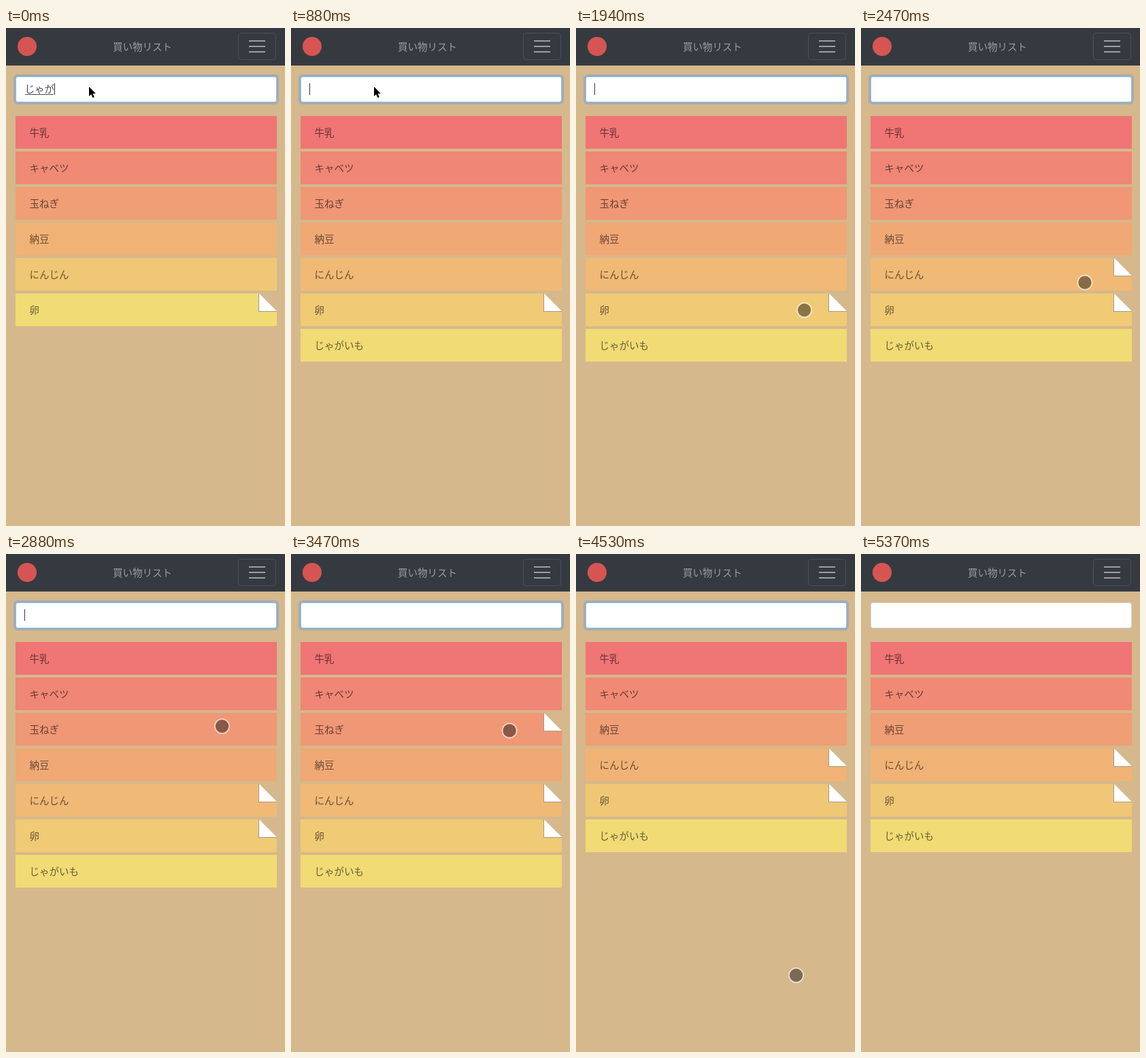
An HTML page with a canvas for the animation above (5470 ms loop, 410x730 px).

```html
<!DOCTYPE html>
<html lang="ja">
<head>
<meta charset="utf-8">
<title>買い物リスト</title>
<style>
  html, body { margin: 0; width: 100%; height: 100%; overflow: hidden; background: #d5b88c; }
  canvas { display: block; }
</style>
</head>
<body>
<canvas id="stage" width="410" height="730"></canvas>
<script>
const ctx = document.getElementById('stage').getContext('2d');
const LOOP = 5470;
const TICK = 1000 / 17;
const TAN = '#d5b88c';
const FONT = '14.5px "Noto Sans CJK JP", "Noto Sans CJK", sans-serif';

// Moments of the story, in ms
const ADDED = 880, CARROT_FOLD = 2350, ONION_FOLD = 3180, REMOVED = 3940;
const BLUR = 5290, BLURRED = 5370;

const typing = [[0, 'じゃが'], [110, 'じゃがい'], [350, 'じゃがいｍ'], [470, 'じゃがいも'], [ADDED, '']];

const linear = p => p;
const easeOut = p => 1 - (1 - p) ** 2.4;
const easeInOut = p => p * p * (3 - 2 * p);

// Touch pointer: [tick, x, y, easing towards this point]
const path = [
  [22, 121, 90], [28, 335.5, 420.5, easeOut],
  [32, 335.5, 420.5], [33, 335.5, 413.5], [34, 335.5, 413.5],
  [39, 329.5, 378.5, easeInOut], [41, 329.5, 378.5],
  [49, 317.5, 252.5, easeInOut], [54, 317.5, 252.5],
  [61, 322, 260.5, easeInOut], [65, 322, 260.5],
  [66, 193.5, 260.5], [67, 58, 260.5], [72, 58, 260.5],
  [73, 130, 300], [74, 220, 375], [75, 284, 470], [76, 312, 548],
  [77, 323.5, 617.5], [82, 352.5, 709.5, easeOut], [83, 366.5, 725]
];

function pointerAt(tick) {
  const i = path.findIndex(k => k[0] >= tick);
  if (i < 1) return null;
  const [t0, x0, y0] = path[i - 1];
  const [t1, x1, y1, ease = linear] = path[i];
  const p = ease((tick - t0) / (t1 - t0));
  return [x0 + (x1 - x0) * p, y0 + (y1 - y0) * p];
}

function box(x, y, w, h, r, fill) {
  ctx.beginPath();
  ctx.roundRect(x, y, w, h, r);
  ctx.fillStyle = fill;
  ctx.fill();
}

function rect(x, y, w, h, fill) {
  ctx.fillStyle = fill;
  ctx.fillRect(x, y, w, h);
}

function poly(points, fill) {
  ctx.beginPath();
  points.forEach(([x, y]) => ctx.lineTo(x, y));
  ctx.closePath();
  ctx.fillStyle = fill;
  ctx.fill();
}

function disc(x, y, r, fill) {
  ctx.beginPath();
  ctx.arc(x, y, r, 0, Math.PI * 2);
  ctx.fillStyle = fill;
  ctx.fill();
}

function label(text, x, y, fill) {
  ctx.fillStyle = fill;
  ctx.fillText(text, x, y);
}

function drawHeader() {
  rect(0, 0, 410, 55, '#353a41');
  disc(31, 27, 14, '#d65553');
  label('買い物リスト', 157, 32.5, '#9b9da0');
  ctx.beginPath();
  ctx.roundRect(341.5, 7.5, 55, 39, 4);
  ctx.strokeStyle = '#4b5056';
  ctx.lineWidth = 1;
  ctx.stroke();
  for (const y of [18, 26, 34]) rect(357, y, 24, 2, '#9b9da0');
}

function drawInput(t) {
  const focus = t < BLUR ? 1 : t < BLURRED ? 0.45 : 0;
  ctx.globalAlpha = focus;
  box(11, 68, 390, 44, 6, '#a6aaaf');
  ctx.globalAlpha = 1;
  box(14, 71, 384, 38, 4, '#ced4da');
  ctx.globalAlpha = focus;
  box(14, 71, 384, 38, 4, '#80bdff');
  ctx.globalAlpha = 1;
  box(15, 72, 382, 36, 3, '#fff');

  const text = typing.filter(k => k[0] <= t).pop()[1];
  const width = text.length * 14.5;
  label(text, 27.5, 95, '#495057');
  if (text && t < 640) rect(28, 97, width - 1.5, 1, '#495057');

  const blinkOff = t >= 1300 && Math.floor((t - 1300) / 502) % 2 === 0;
  if (t < BLUR && !blinkOff) rect(Math.floor(27.5 + width), 81, 1, 17, '#33383d');
}

function drawFold(y) {
  rect(371, y, 27, 27, TAN);
  poly([[371, y], [372, y], [398, y + 26], [398, y + 27], [371, y + 27]], '#a39a83');
  poly([[372, y], [398, y + 26], [372, y + 26]], '#fff');
}

function drawList(t) {
  const items = ['牛乳', 'キャベツ', '玉ねぎ', '納豆', 'にんじん', '卵'];
  const folded = ['卵'];
  if (t >= ADDED) items.push('じゃがいも');
  if (t >= CARROT_FOLD) folded.push('にんじん');
  if (t >= ONION_FOLD) folded.push('玉ねぎ');
  if (t >= REMOVED) items.splice(2, 1);

  items.forEach((name, i) => {
    const y = 129 + i * 52;
    rect(14, y, 384, 48, `hsl(${50 * i / (items.length - 1)}, 80%, 70%)`);
    label(name, 34.5, y + 30, 'rgba(0,0,0,.57)');
    if (folded.includes(name)) drawFold(y);
  });
}

function drawArrow(x, y) {
  const shape = [[0, 0], [0, 14], [3.2, 11.2], [5.4, 16.2], [7.8, 15.2], [5.7, 10.3], [9.8, 10]]
    .map(([dx, dy]) => [x + dx, y + dy]);
  poly(shape, '#000');
  ctx.strokeStyle = '#fff';
  ctx.lineWidth = 2;
  ctx.lineJoin = 'round';
  ctx.stroke();
  poly(shape, '#000');
}

function drawPointer(t) {
  const tick = Math.floor((t + 15) / TICK);
  if (tick < 23) return drawArrow(122, 86);
  const spot = pointerAt(tick);
  if (!spot) return;
  disc(...spot, 9.8, 'rgba(12,12,16,.45)');
  ctx.beginPath();
  ctx.arc(...spot, 10.6, 0, Math.PI * 2);
  ctx.strokeStyle = 'rgba(255,255,255,.55)';
  ctx.lineWidth = 1.8;
  ctx.stroke();
}

function draw(t) {
  ctx.font = FONT;
  rect(0, 0, 410, 730, TAN);
  drawHeader();
  drawInput(t);
  drawList(t);
  drawPointer(t);
}

const start = performance.now();
function frame() {
  draw((performance.now() - start) % LOOP);
  requestAnimationFrame(frame);
}
frame();
</script>
</body>
</html>
```
